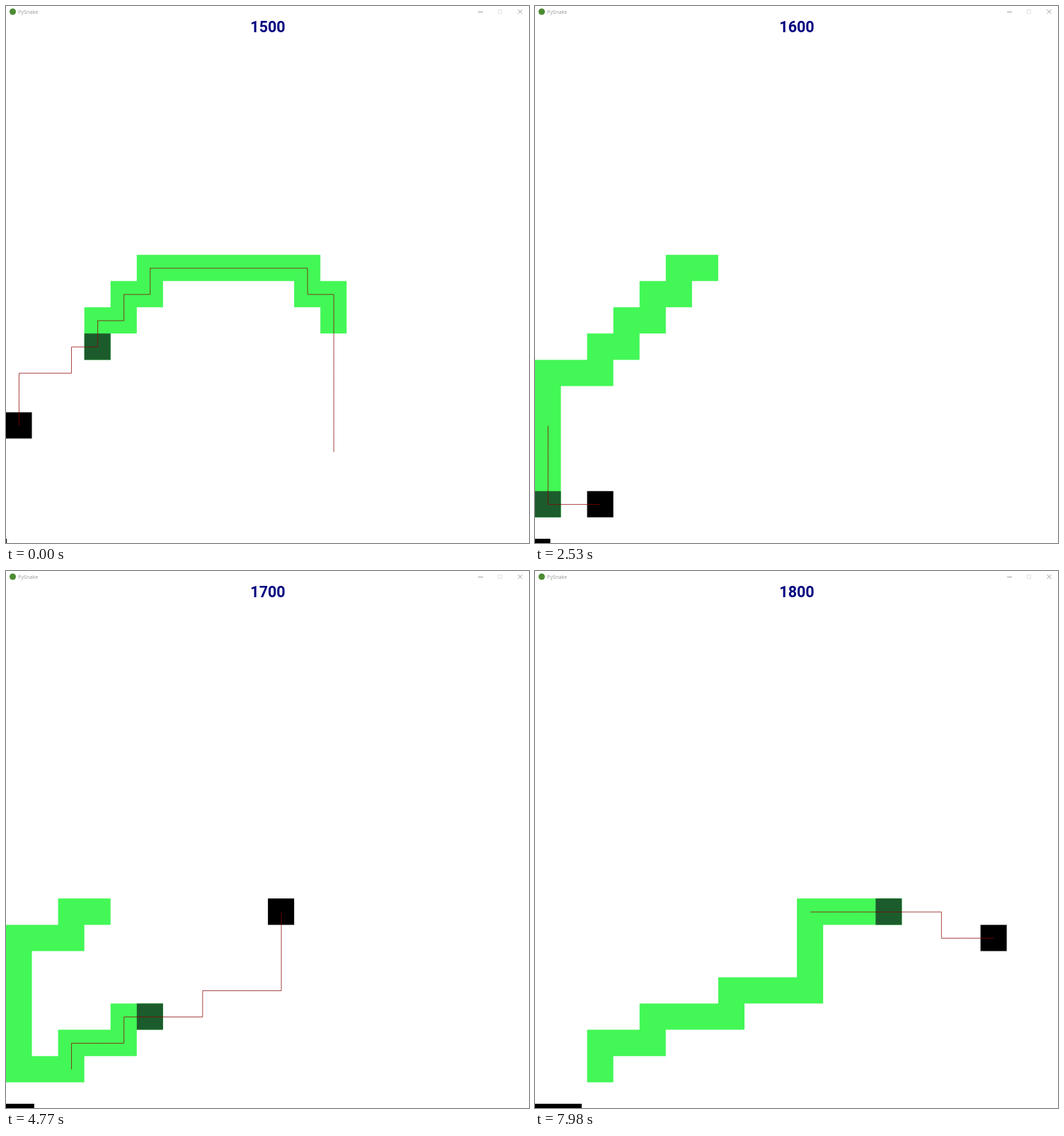
An HTML page with a canvas that plays this animation: 739 px wide and 758 px high, repeating every 8000 ms.

```html
<!DOCTYPE html>
<html lang="en">
<head>
<meta charset="utf-8">
<title>PySnake</title>
<style>
  html, body { margin: 0; width: 100%; height: 100%; overflow: hidden; background: #fff; }
  canvas { display: block; }
</style>
</head>
<body>
<canvas id="stage" width="739" height="758"></canvas>
<script>
const ctx = document.getElementById('stage').getContext('2d');
const LOOP = 8000, FRAME = 80, TICK = 256, TICK_LEAD = 70;
const START_HEAD = 19, START_LENGTH = 15;
const CELL = 37.06, LEFT = -0.5, TOP = 17.6;

// Moves of the snake, one string per planned path; each path ends at the food.
const legs = ['U6 L U L6 DLDLDLDL L D2', 'D3 R2', 'U R2 U R3 U R3 U3', 'R5 D R2'];
const steps = { U: [0, -1], D: [0, 1], L: [-1, 0], R: [1, 0] };

const route = [[12, 16]];
const meals = legs.map(leg => {
  for (const [, move, count] of leg.matchAll(/([UDLR])(\d*)/g)) {
    for (let i = 0; i < (count || 1); i++) {
      const [c, r] = route[route.length - 1];
      route.push([c + steps[move][0], r + steps[move][1]]);
    }
  }
  return route.length - 1;
});

// After each meal the snake rests for one tick while it plans.
const restTicks = meals.map((meal, i) => meal - START_HEAD + i + 1);

function fillCells(color, cells) {
  ctx.fillStyle = color;
  ctx.beginPath();
  for (const [c, r] of cells) ctx.rect(LEFT + c * CELL, TOP + r * CELL, CELL, CELL);
  ctx.fill();
}

function stroke(color, width, points) {
  ctx.strokeStyle = color;
  ctx.lineWidth = width;
  ctx.beginPath();
  points.forEach(([x, y]) => ctx.lineTo(x, y));
  ctx.stroke();
}

function drawPath(cells) {
  const middle = CELL / 2 + 0.4;
  stroke('#8b0000', 0.74, cells.map(([c, r]) =>
    [LEFT + c * CELL + middle, TOP + r * CELL + middle]));
}

function drawTitleBar() {
  ctx.fillStyle = '#4b8b32';
  ctx.beginPath();
  ctx.arc(9.5, 8, 4.5, 0, 2 * Math.PI);
  ctx.fill();
  ctx.fillStyle = '#999';
  ctx.textAlign = 'left';
  ctx.font = '7.3px "Open Sans", sans-serif';
  ctx.fillText('PySnake', 17, 11);
  stroke('#888', 0.8, [[667, 8.5], [674, 8.5]]);
  ctx.strokeStyle = '#ddd';
  ctx.strokeRect(695.5, 5.5, 5, 5);
  stroke('#888', 0.8, [[723.5, 5], [729.5, 11]]);
  stroke('#888', 0.8, [[729.5, 5], [723.5, 11]]);
}

function drawScore(eaten) {
  ctx.fillStyle = '#000080';
  ctx.textAlign = 'center';
  ctx.font = 'bold 21.5px Roboto, sans-serif';
  ctx.fillText(1500 + 100 * eaten, 370, 37);
}

function drawPointer(x, y, fill, outline) {
  ctx.save();
  ctx.translate(x, y);
  ctx.scale(0.8, 0.8);
  ctx.fillStyle = fill;
  ctx.strokeStyle = outline;
  ctx.lineWidth = 0.8;
  const shape = new Path2D('M0 0V11L2.5 9L4.5 13L6 12L4.5 8.5L7.5 8Z');
  ctx.fill(shape);
  ctx.stroke(shape);
  ctx.restore();
}

// The pointer rests on the snake, then sweeps up to the right and leaves.
function drawMouse(t) {
  if (t < 3050 || t > 4100) return;
  const k = Math.min(1, Math.max(0, (t - 3500) / 500));
  const ease = k * k * (3 - 2 * k);
  const [fill, outline] = k > 0 ? ['#000', '#fff'] : ['#fff', '#222'];
  drawPointer(44.5 + 233.5 * ease, 705.5 - 128.5 * ease, fill, outline);
}

function draw(time) {
  const t = Math.max(0, Math.floor((time - 50) / FRAME) * FRAME + 50);
  const tick = Math.floor((t + TICK_LEAD) / TICK);
  const head = START_HEAD + tick - restTicks.filter(rest => tick >= rest).length;
  const eaten = meals.filter(meal => head >= meal).length;
  const tail = head - START_LENGTH + 1 - eaten;
  const leg = restTicks.filter(rest => tick > rest).length;

  ctx.fillStyle = '#fff';
  ctx.fillRect(0, 0, 739, 758);
  drawTitleBar();
  fillCells('#000', [route[meals[eaten]]]);
  fillCells('#43f756', route.slice(tail, head + 1));
  fillCells('#1c5c2c', [route[head]]);
  drawPath(route.slice(leg ? meals[leg - 1] : 0, meals[leg] + 1));
  drawScore(eaten);
  ctx.fillStyle = '#000';
  ctx.fillRect(0, 752, 1 + t * 0.00815, 6);
  drawMouse(t);
}

const begin = performance.now();
function loop() {
  draw((performance.now() - begin) % LOOP);
  requestAnimationFrame(loop);
}
loop();
</script>
</body>
</html>
```
